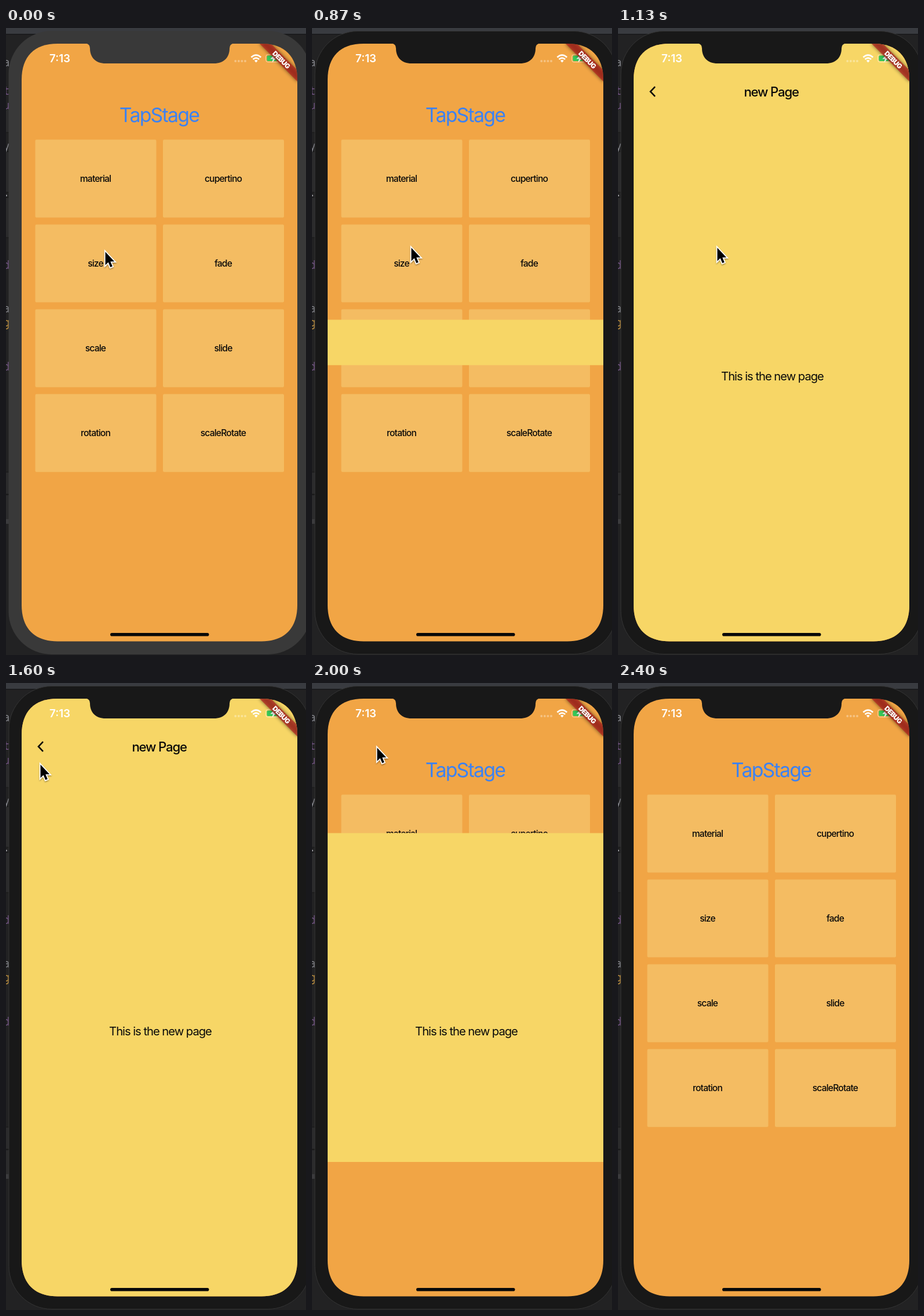
Write an HTML page that moves like this. It is 518 px wide and 1080 px high and loops after 2.54 s.

```html
<!DOCTYPE html>
<html lang="en">
<head>
<meta charset="utf-8">
<title>Page size transition</title>
<style>
html, body { margin: 0; width: 100%; height: 100%; overflow: hidden; background: #222; }
svg { display: block; width: 518px; height: 1080px; }
text { font-family: Inter, Roboto, sans-serif; letter-spacing: -.052em; }
.mid { text-anchor: middle; }
.code text { font: 19px "Noto Sans Mono", monospace; letter-spacing: 0; }
</style>
</head>
<body>
<svg viewBox="0 0 518 1080" xmlns="http://www.w3.org/2000/svg">
  <defs>
    <clipPath id="screen">
      <path d="M27 89C27 49 49 27 89 27H441C481 27 503 49 503 89V994C503 1034 481 1056.5 441 1056.5H89C49 1056.5 27 1034 27 994Z"/>
    </clipPath>
    <clipPath id="grow"><rect id="window" x="27" width="476"/></clipPath>
    <clipPath id="corner"><rect x="403" y="27" width="100" height="100"/></clipPath>
    <filter id="blur" x="-30%" y="-80%" width="160%" height="260%"><feGaussianBlur stdDeviation="3"/></filter>
    <filter id="soft" x="-50%" y="-50%" width="200%" height="200%">
      <feDropShadow dx="0" dy="1.5" stdDeviation="1.3" flood-opacity=".4"/>
    </filter>
  </defs>

  <rect width="518" height="1080" fill="#222223"/>
  <rect width="518" height="10" fill="#393b40"/>
  <rect y="10" width="518" height="1.5" fill="#18191b"/>
  <g class="code" id="code"></g>

  <g id="grey"><rect x="4.5" y="5" width="522" height="1074" rx="74" fill="#393939"/></g>
  <g id="dark"><rect x="5" y="5.5" width="521" height="1073" rx="74" fill="#181818" stroke="#343434"/></g>

  <g clip-path="url(#screen)">
    <rect x="27" y="27" width="476" height="1030" fill="#f1a545"/>
    <text class="mid" x="264.5" y="161.5" font-size="33.8" fill="#3c82f3">TapStage</text>
    <g id="cards"></g>
    <g clip-path="url(#grow)">
      <rect x="27" y="27" width="476" height="1030" fill="#f7d666"/>
      <path d="M64 101.2L56 109.5L64 117.8" fill="none" stroke="#080808" stroke-width="2.6"/>
      <text class="mid" x="264.7" y="117.5" font-size="22.2" font-weight="500" fill="#080808">new Page</text>
      <text class="mid" x="266.5" y="607" font-size="20.3" fill="#0a0a0a">This is the new page</text>
    </g>

    <text class="mid" x="93" y="59.3" font-size="18.8" font-weight="600" fill="#fff" style="letter-spacing:0">7:13</text>
    <g fill="#fff" fill-opacity=".33">
      <circle cx="396.2" cy="57" r="2"/><circle cx="401.8" cy="57" r="2"/>
      <circle cx="407.4" cy="57" r="2"/><circle cx="413" cy="57" r="2"/>
    </g>
    <g fill="none" stroke="#fff" stroke-width="2.7">
      <path d="M423.4 50.6Q431.8 42.8 440.2 50.6"/>
      <path d="M426.5 54Q431.8 49.2 437.1 54"/>
    </g>
    <path d="M428.9 56.2Q431.8 53.8 434.7 56.2L431.8 59.4Z" fill="#fff"/>
    <rect x="448.7" y="45.7" width="25.6" height="13" rx="3.6" fill="none" stroke="#fff" stroke-opacity=".55"/>
    <rect x="450.4" y="47.4" width="21.5" height="9.6" rx="2" fill="#35c759"/>
    <path d="M475.6 50.2Q478 52.2 475.6 54.2Z" fill="#fff" fill-opacity=".55"/>
    <path d="M464 45.5L456.5 53.3H461L459.5 59.5L467 51.2H462.3Z" fill="#fff"/>

    <g clip-path="url(#corner)">
      <g transform="translate(503 27) rotate(45)">
        <rect x="-46" y="32.2" width="92" height="13.8" fill="#000" fill-opacity=".55" filter="url(#blur)"/>
        <rect x="-46" y="32.2" width="92" height="13.8" fill="#b71c1c" fill-opacity=".66"/>
        <text class="mid" y="43.3" font-size="11.6" font-weight="900" fill="#fff">DEBUG</text>
      </g>
    </g>
    <rect x="180" y="1042" width="170.5" height="5.6" rx="2.8" fill="#080808"/>
  </g>

  <path id="notch" d="M135 24V26.5H137Q145 27 145 35C145 51 155 61 172 61H359C376 61 386 51 386 35Q386 27 394 26.5H396V24Z"/>

  <g id="cursor" filter="url(#soft)">
    <path d="M1.5 1.5V24.5L6.6 19.6L10.2 28L13.8 26.5L10.3 18.3H17.2Z" fill="#050505" stroke="#fff" stroke-width="3.4" paint-order="stroke" stroke-linejoin="miter"/>
  </g>
</svg>
<script>
const $ = id => document.getElementById(id);
const LOOP = 2540, STEP = 1000 / 15;
const MID = 541.7, FULL = 1030;

// Sliver of the editor behind the phone
const glyphs = [["a", 66, "#85868c"], ["t", 115, "#755687"], ["u", 140, "#755687"],
  ["y", 210, "#85868c"], [".", 290, "#a0a0a4"], ["d", 415, "#755687"],
  ["a", 490, "#85868c"], ["g", 514, "#c1913f"], ["d", 590, "#755687"]];
const blocks = [[140, 40], [213, 70], [292, 69], [765, 38], [804, 46]];
$("code").innerHTML =
  blocks.map(([y, h]) => `<rect x="-2" y="${y}" width="9" height="${h}" fill="#2b2b2c" stroke="#161617"/>`).join("") +
  `<rect y="846" width="7" height="8" fill="#3b3b3d"/>` +
  glyphs.map(([c, y, fill]) => `<text x="-5" y="${y}" fill="${fill}">${c}</text>`).join("");

const labels = ["material", "cupertino", "size", "fade", "scale", "slide", "rotation", "scaleRotate"];
$("cards").innerHTML = labels.map((label, i) => {
  const x = 50.5 + (i % 2) * 220.5, y = 192.3 + (i >> 1) * 146.1;
  return `<rect x="${x}" y="${y}" width="209" height="134.2" rx="2.3" fill="#f4bc62"/>
    <text class="mid" x="${x + 104}" y="${y + 72.4}" font-size="15.6" font-weight="500" fill="#080808">${label}</text>`;
}).join("");

// [ms, x, y]
const path = [[0, 170, 384], [400, 170, 377], [1130, 170, 377], [1600, 58, 139],
  [1800, 57, 106], [1867, 60, 106], [2000, 111, 110], [2067, 170, 21]];
const pointerEnd = 2100, focusAt = 730;

const clamp = v => Math.max(0, Math.min(1, v));
const ease = v => v * v * (3 - 2 * v);

function pointer(t) {
  let i = 0;
  while (i < path.length - 2 && t >= path[i + 1][0]) i++;
  const [t0, x0, y0] = path[i], [t1, x1, y1] = path[i + 1];
  const k = ease(clamp((t - t0) / (t1 - t0)));
  return [x0 + (x1 - x0) * k, y0 + (y1 - y0) * k];
}

function pageSize(t) {
  return t < 1500 ? clamp((t - 845) / 285) : clamp((2165 - t) / 300);
}

function draw(ms) {
  const t = Math.min(36, Math.floor((ms + 4) / STEP)) * STEP;
  const h = FULL * pageSize(t);
  $("window").setAttribute("y", MID - h / 2);
  $("window").setAttribute("height", h);

  const dark = t >= focusAt;
  $("grey").style.display = dark ? "none" : "";
  $("dark").style.display = dark ? "" : "none";
  $("notch").setAttribute("fill", dark ? "#181818" : "#393939");

  const [x, y] = pointer(t);
  $("cursor").setAttribute("transform", `translate(${x} ${y})`);
  $("cursor").style.display = t < pointerEnd ? "" : "none";
}

const start = performance.now();
function tick() {
  draw((performance.now() - start) % LOOP);
  requestAnimationFrame(tick);
}
tick();
</script>
</body>
</html>
```
